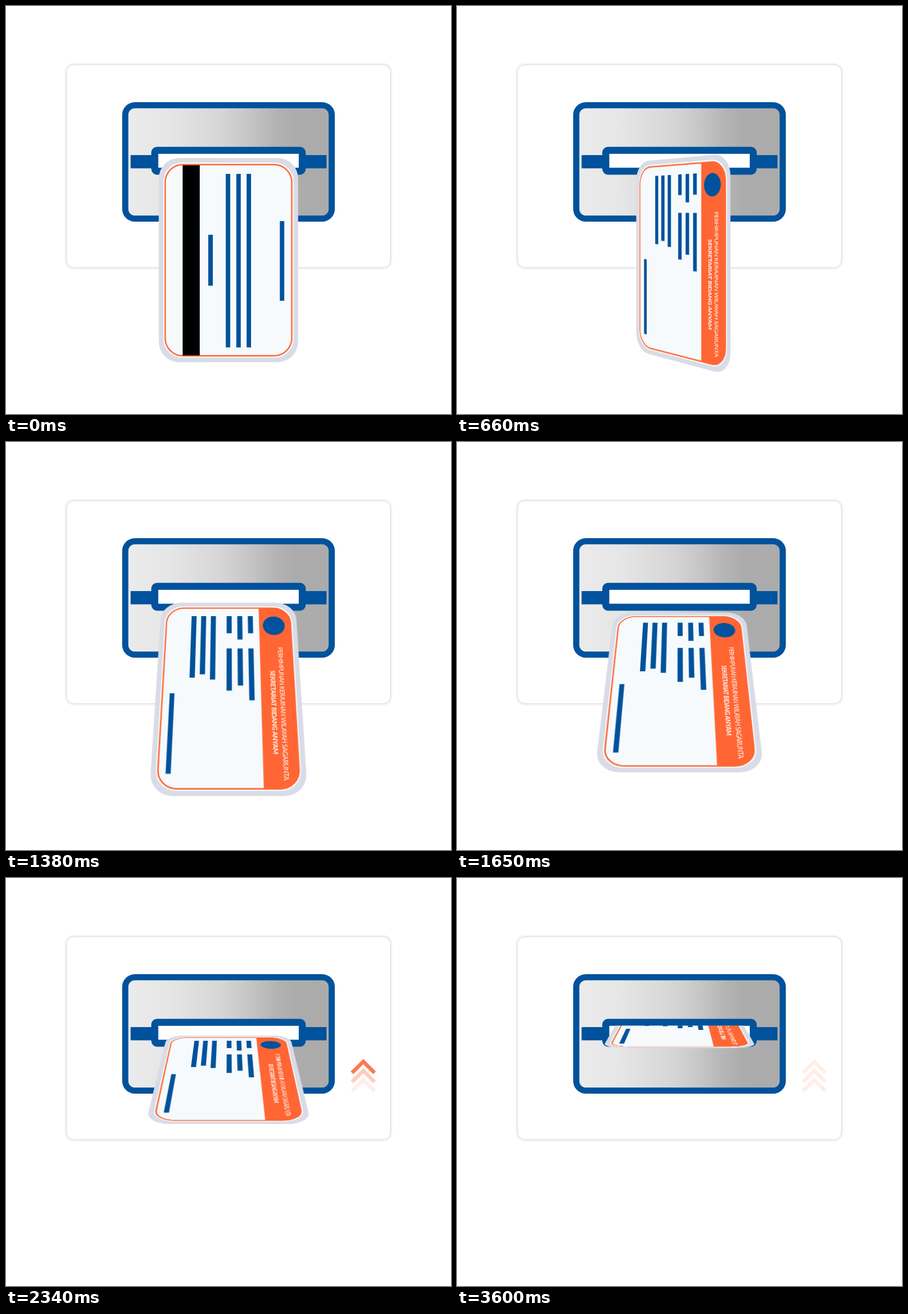
An HTML page that plays this animation: 781x717 px, repeating every 4500 ms.

```html
<!DOCTYPE html>
<html lang="id">
<head>
<meta charset="utf-8">
<title>Card slot</title>
<style>
  html, body { margin: 0; width: 100%; height: 100%; overflow: hidden; background: #fff; }
  .stage { position: relative; width: 781px; height: 717px; max-width: 100%; max-height: 100%; overflow: hidden; contain: strict; }
  svg, .scene, .card { position: absolute; left: 0; top: 0; width: 781px; height: 717px; }

  /* The card vanishes behind the upper lip of the slot. */
  .scene {
    overflow: hidden;
    perspective: 1100px;
    perspective-origin: 390.5px 358.5px;
    clip-path: inset(259.5px 0 0 0);
  }
  .card {
    transform-style: preserve-3d;
    transform-origin: 390.5px 358.5px;
    animation: insert 4.5s linear infinite;
  }
  .face { backface-visibility: hidden; transform-origin: 390.5px 358.5px; }
  .front { transform: rotateY(180deg); }

  @keyframes insert {
    0% { transform: translate3d(0, 0, 0) rotateX(0deg) rotateY(0deg); }
    20% { transform: translate3d(0, 0, 0) rotateX(0deg) rotateY(180deg); }
    40% {
      transform: translate3d(0, 0, 0) rotateX(56.25deg) rotateY(180deg);
      animation-timing-function: cubic-bezier(.35, .31, .65, .65);
    }
    66.67%, 100% { transform: translate3d(0, -122.7px, -150.7px) rotateX(75.1deg) rotateY(180deg); }
  }

  .blue { fill: #00529c; }
  .orange { fill: #ff6633; }
  .rim { fill: none; stroke: #ff6633; stroke-width: 2.4; }
  .label { fill: #fff; font: 10.8px Lato, "Open Sans", sans-serif; text-anchor: middle; letter-spacing: -.45px; }
  .strong { font-size: 11px; font-weight: 700; letter-spacing: -.3px; }

  .arrows { fill: none; stroke: #ff6633; stroke-width: 6.5; animation: show 4.5s step-end infinite; }
  .low { animation: low 4.5s linear infinite; }
  .mid { animation: mid 4.5s linear infinite; }
  .top { animation: top 4.5s linear infinite; }
  @keyframes show { 0% { opacity: 0; } 40%, 100% { opacity: 1; } }
  @keyframes low {
    0%, 40%, 52%, 60%, 72%, 100% { opacity: .11; }
    44%, 64% { opacity: 1; }
  }
  @keyframes mid {
    0%, 40%, 54%, 60%, 74%, 100% { opacity: .11; }
    46%, 66% { opacity: 1; }
  }
  @keyframes top {
    0%, 44%, 60%, 64%, 80%, 100% { opacity: .11; }
    50.67%, 70.67% { opacity: 1; }
  }
  .panel {
    position: absolute; left: 107px; top: 104px; width: 567px; height: 355px;
    border-radius: 12px; background: #fff; box-shadow: 0 0 5px 1px rgba(0, 0, 0, .19);
  }
</style>
</head>
<body>
<div class="stage">
  <div class="panel"></div>

  <svg viewBox="0 0 781 717">
    <defs>
      <linearGradient id="steel" gradientUnits="userSpaceOnUse" x1="215" y1="0" x2="566" y2="0">
        <stop offset="0" stop-color="#ebebec"/>
        <stop offset=".2" stop-color="#e6e6e7"/>
        <stop offset=".33" stop-color="#dedede"/>
        <stop offset=".47" stop-color="#d5d5d5"/>
        <stop offset=".61" stop-color="#c5c5c5"/>
        <stop offset=".73" stop-color="#b4b4b4"/>
        <stop offset=".82" stop-color="#acacac"/>
        <stop offset="1" stop-color="#ababab"/>
      </linearGradient>
      <clipPath id="inner"><rect x="279.4" y="278.7" width="222.2" height="336" rx="31"/></clipPath>
      <g id="blank">
        <rect x="268.2" y="267" width="244.5" height="359" rx="36" fill="#d9dce6"/>
        <rect x="276.3" y="275" width="228.4" height="343" rx="33" fill="#f8fbfc"/>
        <rect x="279.4" y="278.7" width="222.2" height="336" rx="31" fill="#f6fafc"/>
      </g>
      <rect id="rim" class="rim" x="279.4" y="278.7" width="222.2" height="336" rx="31"/>
      <path id="arrow" d="M607.3 342.4 627.1 322.6 646.9 342.4"/>
    </defs>

    <rect x="209.3" y="174.3" width="362.4" height="199.4" rx="17" fill="url(#steel)" stroke="#00529c" stroke-width="10.8"/>
    <rect class="blue" x="218.7" y="262" width="343.8" height="23.3"/>
    <rect class="blue" x="255" y="247.5" width="271" height="49" rx="10"/>
    <rect x="267.3" y="259.8" width="246.5" height="24.4" fill="#fff"/>

    <g class="arrows">
      <use href="#arrow" class="top"/>
      <use href="#arrow" class="mid" y="16"/>
      <use href="#arrow" class="low" y="32"/>
    </g>
  </svg>

  <div class="scene">
    <div class="card">
      <svg class="face" viewBox="0 0 781 717">
        <use href="#blank"/>
        <use href="#rim"/>
        <rect x="310" y="280" width="30" height="334"/>
        <path class="blue" d="M355 402h8v89.5h-8z M385.7 295h7.8v305h-7.8z M404.2 295h7.8v305h-7.8z
          M422.3 295h7.8v305h-7.8z M480.6 378h7.8v140h-7.8z"/>
      </svg>

      <svg class="face front" viewBox="0 0 781 717">
        <use href="#blank"/>
        <rect class="orange" x="445.3" y="278" width="60" height="338" clip-path="url(#inner)"/>
        <use href="#rim"/>
        <path class="blue" d="M324 296h9v125h-9z M341.3 296h9v118.5h-9z M358.8 296h9v128.5h-9z
          M387.2 296h9v36.3h-9z M406.3 296h9v49.3h-9z M425.3 296h9v36.3h-9z
          M387.2 363.5h9v82h-9z M406.3 363.5h9v72.5h-9z M425.3 363.5h9v100h-9z
          M291.7 450.5h8v140h-8z"/>
        <circle class="blue" cx="471.5" cy="316.5" r="19.5"/>
        <text class="label" transform="translate(476.8 481) rotate(90)">PERHIMPUNAN KERAJINAN WILAYAH SAGARUNTA</text>
        <text class="label strong" transform="translate(462 482.5) rotate(90)">SEKRETARIAT BIDANG ANYAM</text>
      </svg>
    </div>
  </div>
</div>
</body>
</html>
```
